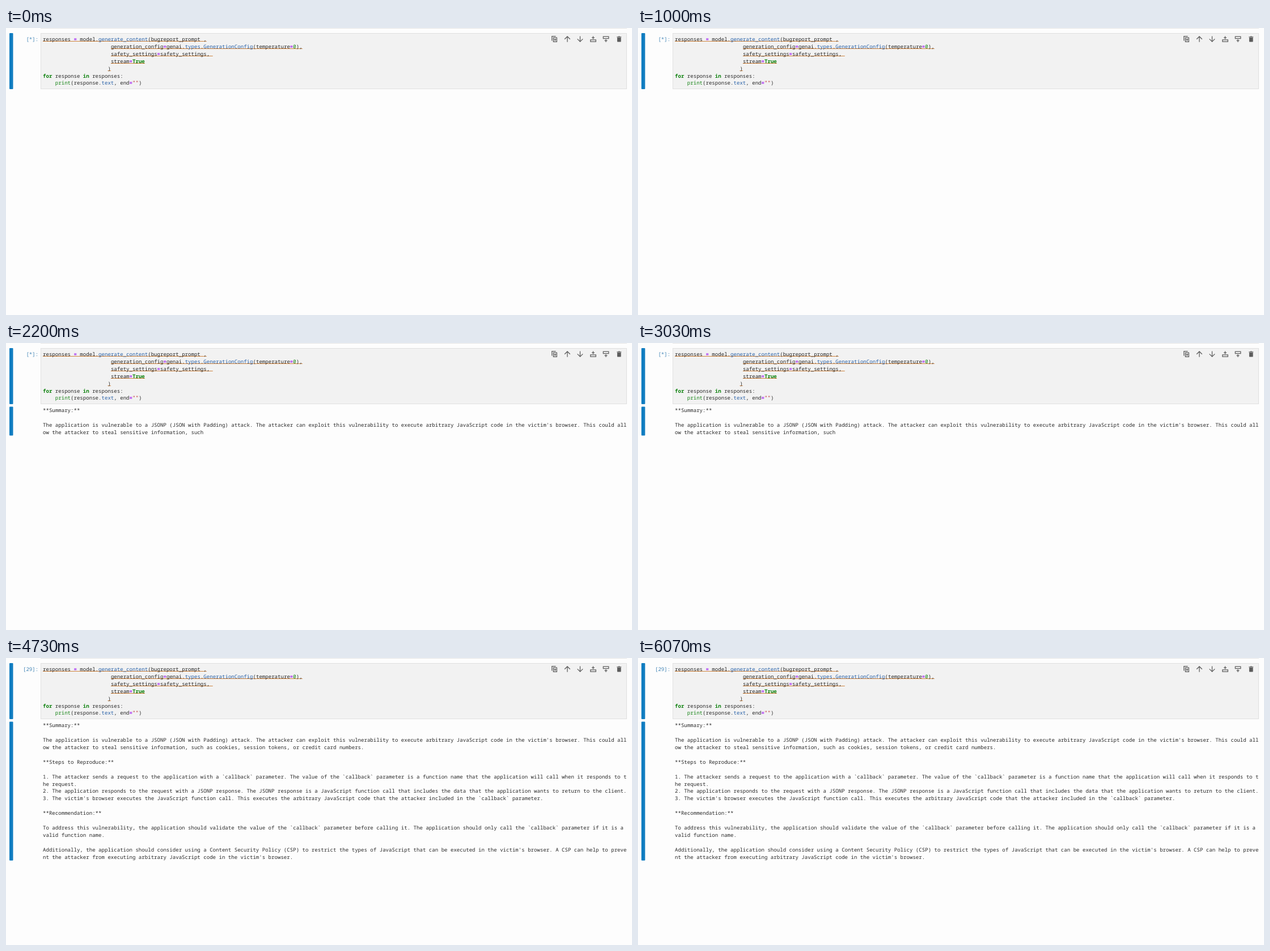
Recreate the animation shown at these times as an HTML page. Size 1104 by 507 pixels, loop 6900 ms.

```html
<!DOCTYPE html>
<html lang="en">
<head>
<meta charset="utf-8">
<title>Notebook cell streaming output</title>
<style>
  html, body { margin: 0; width: 100%; height: 100%; overflow: hidden; background: #fdfdfd; }
  svg { display: block; width: 100vw; height: 100vh; }
  text { font: 9.083px "Noto Sans Mono", "DejaVu Sans Mono", monospace; fill: #2a2a2a; white-space: pre; text-rendering: geometricPrecision; }
  .bar { fill: #107dc1; }
  #prompt { fill: #3f83b5; }
  .kw { fill: #0a800a; font-weight: 700; }
  .fn, .num { fill: #1a861a; }
  .op { fill: #a020f0; font-weight: 700; }
  .prop { fill: #2a62a8; }
  .str { fill: #ba2121; }
  .lint { stroke: #cf8540; stroke-width: 1; }
  .icons { fill: none; stroke: #5c5c5c; stroke-width: 1.25; }
  .icons .solid { fill: #5c5c5c; stroke: none; }
</style>
</head>
<body>
<svg viewBox="0 0 1104 507" preserveAspectRatio="none">
  <rect width="1104" height="507" fill="#fdfdfd"/>
  <path d="M61 .5H1095" stroke="#e6e6e6"/>
  <rect x="61.5" y="9.5" width="1033" height="98" fill="#f2f2f2" stroke="#e0e0e0"/>
  <rect class="bar" x="6" y="9" width="6.5" height="99" rx="1"/>
  <rect class="bar" id="outBar" x="6" y="112.5" width="6.5" height="0" rx="1"/>
  <g class="icons">
    <path d="M962.8 22.4V14.7H969.6M965.4 17H971.4V24.4H965.4ZM968.4 18.7V22.7M966.4 20.7H970.4"/>
    <path d="M990 24.8V15.2M985.2 19.8L990 15L994.8 19.8"/>
    <path d="M1012.5 14.4V24M1007.7 19.4L1012.5 24.2L1017.3 19.4"/>
    <path d="M1030.8 20.8H1040.3V24.2H1030.8ZM1035.5 14.5V19.5M1033 17H1038"/>
    <path d="M1053.3 15.2H1062.8V18.6H1053.3ZM1058 19.9V24.9M1055.5 22.4H1060.5"/>
    <path class="solid" d="M1077.3 15.3H1079.5L1080.1 14.6H1082.4L1083 15.3H1085.2V16.5H1077.3ZM1077.9 17.1H1084.6V23.4Q1084.6 24.6 1083.4 24.6H1079.1Q1077.9 24.6 1077.9 23.4Z"/>
  </g>
  <g id="code"></g>
  <text id="prompt" y="22.8"></text>
  <g id="output"></g>
</svg>
<script>
const LOOP = 6900, COLS = 189, CHAR = 5.45, LEFT = 65, LINE = 12.94;
const $ = id => document.getElementById(id);

const code = [
  [0, 'responses = model.generate_content(bugreport_prompt ,', 53],
  [22, 'generation_config=genai.types.GenerationConfig(temperature=0),', 62],
  [22, 'safety_settings=safety_settings, ', 33],
  [22, 'stream=True', 11],
  [21, ')', 1],
  [0, 'for response in responses:', 0],
  [4, 'print(response.text, end="")', 0]
];

const reply = `**Summary:**

The application is vulnerable to a JSONP (JSON with Padding) attack. The attacker can exploit this vulnerability to execute arbitrary JavaScript code in the victim's browser. This could allow the attacker to steal sensitive information, such as cookies, session tokens, or credit card numbers.

**Steps to Reproduce:**

1. The attacker sends a request to the application with a \`callback\` parameter. The value of the \`callback\` parameter is a function name that the application will call when it responds to the request.
2. The application responds to the request with a JSONP response. The JSONP response is a JavaScript function call that includes the data that the application wants to return to the client.
3. The victim's browser executes the JavaScript function call. This executes the arbitrary JavaScript code that the attacker included in the \`callback\` parameter.

**Recommendation:**

To address this vulnerability, the application should validate the value of the \`callback\` parameter before calling it. The application should only call the \`callback\` parameter if it is a valid function name.

Additionally, the application should consider using a Content Security Policy (CSP) to restrict the types of JavaScript that can be executed in the victim's browser. A CSP can help to prevent the attacker from executing arbitrary JavaScript code in the victim's browser.`;

const upTo = phrase => reply.indexOf(phrase) + phrase.length;
const chunks = [
  [4730, reply.length],
  [2130, upTo('information, such')],
  [1530, upTo('with Padding')],
  [0, 0]
];

const span = (cls, s) => `<tspan class="${cls}">${s}</tspan>`;

function highlight(src) {
  const token = /\b(for|in|True)\b|\b(print)\b|(=)|("")|\.(\w+)|\b(\d+)\b/g;
  return src.replace(token, (m, kw, fn, op, str, prop, num) =>
    kw ? span('kw', kw) : fn ? span('fn', fn) : op ? span('op', op) :
    str ? span('str', str) : prop ? '.' + span('prop', prop) : span('num', num));
}

$('code').innerHTML = code.map(([col, src, lint], i) => {
  const x = LEFT + col * CHAR, y = 22.8 + i * LINE;
  const rule = Math.floor(y) + 1.5;
  return (lint ? `<path class="lint" d="M${x} ${rule}H${x + lint * CHAR}"/>` : '') +
    `<text x="${x}" y="${y}">${highlight(src)}</text>`;
}).join('');

// Break at a fixed column, even inside a word.
const wrap = s => s.split('\n').flatMap(p => p.match(new RegExp(`.{1,${COLS}}`, 'g')) || ['']);

let shown = -1;
function draw(t) {
  const [, count] = chunks.find(([start]) => t >= start);
  if (count === shown) return;
  shown = count;
  const lines = count ? wrap(reply.slice(0, count)) : [];
  $('output').innerHTML = lines.map((s, i) =>
    `<text x="${LEFT}" y="${122 + i * LINE}">${s}</text>`).join('');
  $('outBar').setAttribute('height', lines.length ? lines.length * LINE - 0.7 : 0);
  const label = count === reply.length ? '[29]:' : '[*]:';
  $('prompt').textContent = label;
  $('prompt').setAttribute('x', 57.2 - label.length * CHAR);
}

const begin = performance.now();
function tick() {
  draw((performance.now() - begin) % LOOP);
  requestAnimationFrame(tick);
}
tick();
</script>
</body>
</html>
```
